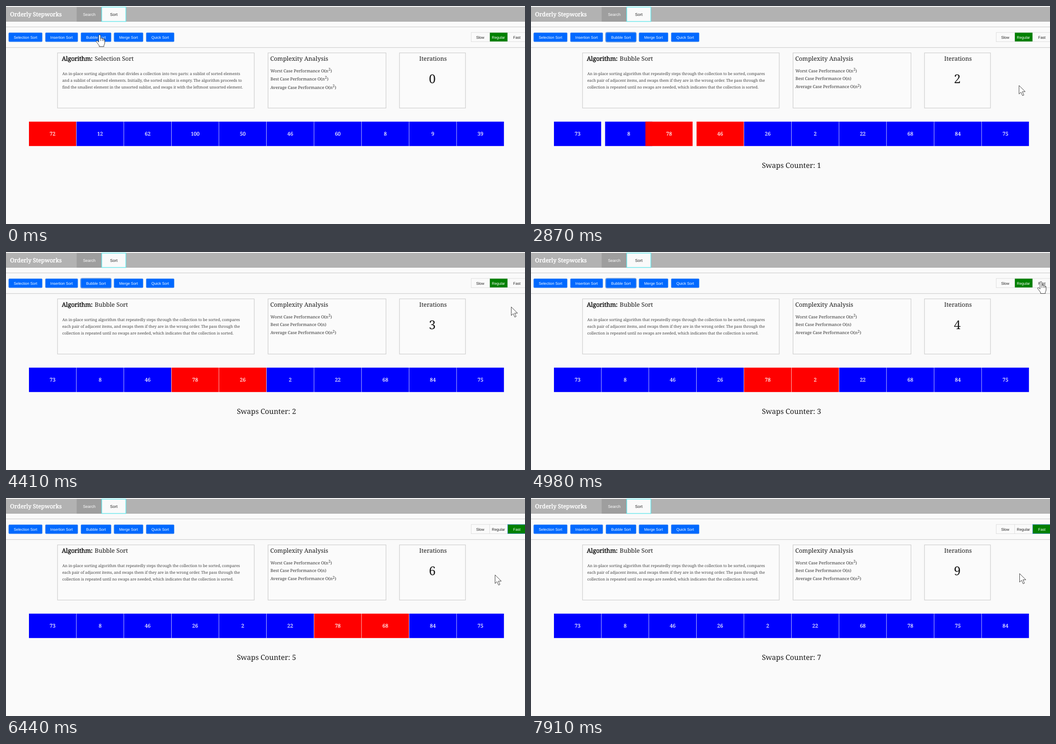
Recreate the animation shown at these times as an HTML page. Size 1153 px wide and 486 px high, loop 8 s.

```html
<!DOCTYPE html>
<html lang="en">
<head>
<meta charset="utf-8">
<title>Sorting demo</title>
<style>
  html, body { margin: 0; width: 100%; height: 100%; overflow: hidden; background: #fafafa; }
  svg { display: block; width: 1153px; height: 486px; text-rendering: geometricPrecision; }
  text { font-family: "Noto Serif", "Liberation Serif", serif; fill: #1a1a1a; white-space: pre; }
  .ui { font-family: "Liberation Sans", Arial, sans-serif; font-size: 8.4px; text-anchor: middle; fill: #222; }
  .tab { font-size: 8.9px; }
  .light { fill: #fff; }
  .head { font-size: 13.3px; }
  .strong { stroke: #111; stroke-width: .5px; }
  .brand { font-size: 12.8px; fill: #fff; stroke: #fff; stroke-width: .5px; }
  .body { font-size: 8.6px; fill: #444; }
  .perf { font-size: 9.4px; fill: #333; }
  .count { font-size: 27px; text-anchor: middle; }
  .swaps { font-size: 16px; }
  .value { font-size: 11.5px; fill: #fff; stroke: #fff; stroke-width: .2px; text-anchor: middle; }
  .mid { text-anchor: middle; }
</style>
</head>
<body>
<svg id="stage" viewBox="0 0 1153 486"></svg>
<script>
const LOOP = 8000, PICK = 570, FAST = 5200, MOVE = 296;
const STEP = 105.6, LEFT = 51;
const RED = '#f00', BLUE = '#00f';
const ADVANCES = [1640, 2625, 3620, 4650, 5575, 6110, 6590, 7110, 7615];
const BEFORE = [72, 12, 62, 100, 50, 46, 60, 8, 9, 39];
const START = [73, 78, 8, 46, 26, 2, 22, 68, 84, 75];

const INFO = [
  {
    name: 'Selection Sort',
    lines: [
      'An in-place sorting algorithm that divides a collection into two parts: a sublist of sorted elements',
      'and a sublist of unsorted elements. Initially, the sorted sublist is empty. The algorithm proceeds to',
      'find the smallest element in the unsorted sublist, and swaps it with the leftmost unsorted element.'
    ],
    perf: [['Worst', 1, 147.5], ['Best', 1, 166], ['Average', 1, 185]]
  },
  {
    name: 'Bubble Sort',
    lines: [
      'An in-place sorting algorithm that repeatedly steps through the collection to be sorted, compares',
      'each pair of adjacent items, and swaps them if they are in the wrong order. The pass through the',
      'collection is repeated until no swaps are needed, which indicates that the collection is sorted.'
    ],
    perf: [['Worst', 1, 147.5], ['Best', 0, 164.5], ['Average', 1, 183.2]]
  }
];

// time, x, y of the pointer tip
const POINTER = [
  [0, 208, 64], [150, 208, 64], [270, 208, 65], [570, 208, 65],
  [840, 330, 230], [1110, 470, 385], [1390, 507, 421], [1930, 507, 421], [1990, 510, 429],
  [2300, 720, 400], [2600, 960, 280], [2870, 1083.5, 177], [2990, 1106, 136], [3140, 1109, 134],
  [3520, 1109, 134], [3700, 1122, 110], [3900, 1131, 98], [4200, 1125, 116], [4410, 1122, 122],
  [4560, 1123, 119], [4750, 1129, 95], [4900, 1133, 66], [5250, 1133, 66],
  [5450, 1112, 120], [5740, 1086, 171], [7780, 1086, 171], [7910, 1085, 168]
];

const stage = document.getElementById('stage');

function add(parent, tag, attrs, content) {
  const el = document.createElementNS('http://www.w3.org/2000/svg', tag);
  for (const key in attrs) el.setAttribute(key, attrs[key]);
  if (content !== undefined) el.textContent = content;
  parent.append(el);
  return el;
}
const rect = (x, y, width, height, fill, more, parent = stage) =>
  add(parent, 'rect', { x, y, width, height, fill, ...more });
const text = (x, y, cls, content, parent = stage) =>
  add(parent, 'text', { x, y, class: cls }, content);
const show = (el, on) => el.setAttribute('visibility', on ? 'visible' : 'hidden');

// Header
rect(0, 2, 1153, 33, '#b2b2b2');
text(9, 23.2, 'brand', 'Orderly Stepworks');
rect(157, 2, 55, 33, '#9e9e9e');
text(185, 21.8, 'ui tab light', 'Search');
rect(212.7, 2.5, 53.6, 32, '#fafafa', { stroke: '#66e6ea', 'stroke-width': 1.5 });
text(239.5, 21.8, 'ui tab', 'Sort');
rect(0, 46, 1153, 1.2, '#ccc');
rect(0, 92, 1153, 1.2, '#ccc');

// Toolbar
const focus = rect(165.5, 58.5, 68.5, 22, '#fff', { stroke: '#4a82d8', rx: 3 });
[['Selection', 5.5, 75.5], ['Insertion', 87, 73], ['Bubble', 166, 68], ['Merge', 239.5, 65.5], ['Quick', 311, 63]]
  .forEach(([name, x, w]) => {
    rect(x + .4, 59.4, w - .8, 20.4, '#0069ff', { stroke: '#74a6ec', 'stroke-width': .9, rx: 2 });
    text(x + w / 2, 72.6, 'ui light', name + ' Sort');
  });

const speeds = [['Slow', 1033, 41, 1053.5], ['Regular', 1074, 40, 1094], ['Fast', 1114, 46, 1135]]
  .map(([name, x, w, mid]) => ({
    name,
    box: rect(x + .5, 59, w, 20.5, '#fafafa', { stroke: '#ddd' }),
    label: text(mid, 72.6, 'ui', name)
  }));

// Panels
[[114, 437], [581.7, 262], [873.7, 146.5]].forEach(([x, w]) =>
  rect(x + .5, 104.5, w, 123, '#fbfbfb', { stroke: '#cfcfcf', 'stroke-width': 1.3 }));
text(124, 121.8, 'head strong', 'Algorithm:');
text(587, 121.8, 'head', 'Complexity Analysis');
text(948.7, 121.8, 'head mid', 'Iterations');
const iterations = text(947, 172.4, 'count', '0');

const panels = INFO.map(({ name, lines, perf }) => {
  const g = add(stage, 'g', {});
  text(197, 121.8, 'head', name, g);
  lines.forEach((line, i) => text(125, 154 + 15.1 * i, 'body', line, g));
  perf.forEach(([kind, squared, y]) => {
    const t = text(587.5, y, 'perf', kind + ' Case Performance O(n', g);
    if (squared) add(t, 'tspan', { dy: -3.6, 'font-size': '8.4px' }, '2');
    add(t, 'tspan', { dy: squared ? 3.6 : 0 }, ')');
  });
  return g;
});

// Array cells
const cells = BEFORE.map(() => {
  const g = add(stage, 'g', {});
  return {
    g,
    box: rect(0, 257.8, 104.8, 54.4, BLUE, {}, g),
    label: text(52.5, 288.9, 'value', '', g)
  };
});
const swapLabel = text(513, 361, 'swaps', '');

// Pointers
const ink = { fill: '#fff', stroke: '#222', 'stroke-width': .9, 'stroke-linejoin': 'round' };
const arrow = add(stage, 'path', {
  d: 'M.5 .5V19.5L4.8 15.4 8.3 23.2 11.3 21.9 7.9 14.3H14.3Z', ...ink
});
const hand = add(stage, 'path', {
  d: 'M-2 2Q-2 0 0 0T2 2V9Q2 7.5 4 7.5T6 9.5Q6 8.2 7.6 8.4T9 10.5Q11.3 9.3 11.3 12V18' +
     'Q11.3 21 9.5 23.5V26.5H-1V24Q-3.5 21-5 18.5L-7.6 15.5Q-8 13-5.2 13.5L-2 16.5ZM2 9V14M6 9.5V14M9 10.5V14',
  ...ink
});

// One bubble pass: the order and swap total after each comparison
const states = [{ order: START, swaps: 0, swapped: false }];
ADVANCES.forEach((_, i) => {
  const last = states[i], order = [...last.order];
  const swapped = order[i] > order[i + 1];
  if (swapped) [order[i], order[i + 1]] = [order[i + 1], order[i]];
  states.push({ order, swaps: last.swaps + swapped, swapped });
});

function pointerAt(t) {
  const i = POINTER.findIndex(p => p[0] > t);
  if (i < 0) return POINTER[POINTER.length - 1].slice(1);
  const [t0, x0, y0] = POINTER[i - 1], [t1, x1, y1] = POINTER[i];
  const p = (t - t0) / (t1 - t0);
  return [x0 + (x1 - x0) * p, y0 + (y1 - y0) * p];
}

function drawCells(t, n) {
  const bubble = t >= PICK, state = states[n];
  const p = n ? Math.min(1, (t - ADVANCES[n - 1]) / MOVE) : 1;
  const rest = state.swapped ? STEP * (1 - p * p * (3 - 2 * p)) : 0;
  cells.forEach(({ g, box, label }, i) => {
    const shift = i === n - 1 ? rest : i === n ? -rest : 0;
    const hot = bubble ? n < 9 && (i === n || i === n + 1) : i === 0;
    g.setAttribute('transform', `translate(${LEFT + STEP * i + shift} 0)`);
    box.setAttribute('fill', hot ? RED : BLUE);
    label.textContent = (bubble ? state.order : BEFORE)[i];
  });
}

function draw(t) {
  const bubble = t >= PICK, fast = t >= FAST;
  const n = ADVANCES.filter(a => t >= a).length;
  show(panels[0], !bubble);
  show(panels[1], bubble);
  show(focus, bubble && !fast);
  show(swapLabel, bubble);
  iterations.textContent = n;
  swapLabel.textContent = 'Swaps Counter: ' + states[n].swaps;

  speeds.forEach(({ name, box, label }) => {
    const on = name === (fast ? 'Fast' : 'Regular');
    box.setAttribute('fill', on ? '#008000' : '#fafafa');
    box.setAttribute('stroke', on && fast ? '#4a90d9' : '#ddd');
    label.setAttribute('class', on ? 'ui light' : 'ui');
  });

  drawCells(t, n);

  const [x, y] = pointerAt(t), over = y < 81;
  show(arrow, !over);
  show(hand, over);
  (over ? hand : arrow).setAttribute('transform', `translate(${x} ${y})`);
}

const begin = performance.now();
function tick() {
  draw((performance.now() - begin) % LOOP);
  requestAnimationFrame(tick);
}
tick();
</script>
</body>
</html>
```
